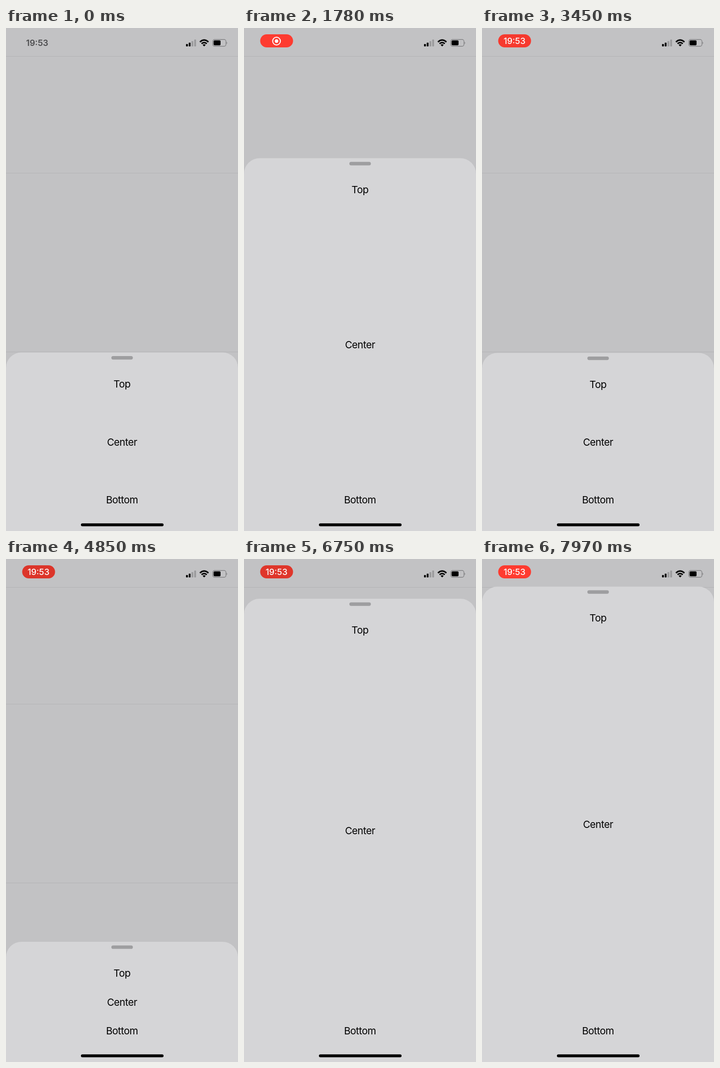
An HTML page for the animation above (8000 ms loop, 480 px wide and 1038 px high).

```html
<!DOCTYPE html>
<html lang="en">
<head>
<meta charset="utf-8">
<title>Bottom sheet</title>
<style>
  html, body { margin: 0; width: 100%; height: 100%; overflow: hidden; background: #c2c2c4; }
  svg { display: block; width: 100vw; height: 100vh; }
  text { font-family: Inter, Roboto, "Liberation Sans", sans-serif; text-anchor: middle; }
  .label { font-size: 20.5px; letter-spacing: -0.5px; }
  .clock { font-size: 17.5px; }
</style>
</head>
<body>
<svg viewBox="0 0 480 1038" preserveAspectRatio="none">
  <rect width="480" height="1038" fill="#c2c2c4"/>
  <path d="M0 58.5H480M0 299.5H480M0 668.5H480" stroke="#b4b4b6"/>

  <text id="plainClock" class="clock" x="64.5" y="37" font-weight="600" fill="#39393b">19:53</text>
  <g id="pill">
    <rect id="pillBody" x="33.5" y="13" width="68" height="27" rx="13.5"/>
    <text id="pillClock" class="clock" x="67.3" y="33.2" font-weight="500" fill="#fff">19:53</text>
    <g id="record" fill="#fff">
      <circle cx="67.3" cy="27" r="8" fill="none" stroke="#fff" stroke-width="2"/>
      <circle cx="67.3" cy="27" r="3.7"/>
    </g>
  </g>

  <g id="signal">
    <rect x="372.5" y="33" width="3.8" height="5" rx="1"/>
    <rect x="378" y="30.2" width="3.8" height="7.8" rx="1"/>
    <rect x="383.7" y="27" width="3.8" height="11" rx="1" fill="#9a9a9c"/>
    <rect x="389.4" y="23.7" width="3.8" height="14.3" rx="1" fill="#9a9a9c"/>
  </g>
  <g fill="none" stroke="#000" stroke-width="3">
    <path d="M401.2 28.8Q410 20.8 418.8 28.8"/>
    <path d="M404.6 32.4Q410 27.6 415.4 32.4"/>
  </g>
  <path d="M406.8 34.7Q410 32.2 413.2 34.7L410 38Z"/>
  <rect x="427.7" y="23.7" width="27.4" height="14" rx="4" fill="none" stroke="#79797b" stroke-width="1.2"/>
  <rect x="429.5" y="25.6" width="14.4" height="10.2" rx="2"/>
  <path d="M456.4 28.4Q458.8 30.7 456.4 33Z" fill="#79797b"/>

  <g id="sheet">
    <rect width="480" height="1100" rx="32" fill="#d5d5d7"/>
    <rect x="218" y="7.5" width="44.5" height="7.2" rx="3.6" fill="#9e9ea0"/>
    <text class="label" x="240" y="72.4">Top</text>
  </g>
  <text id="center" class="label" x="240">Center</text>
  <text class="label" x="240" y="981.4">Bottom</text>
  <rect x="155" y="1022.3" width="171" height="6" rx="3"/>
</svg>
<script>
const LOOP = 8000;
const FULL = 82, HALF = 669.5, TIP = 789.2;
const BASELINE = { top: 72.4, bottom: 981.4 };

// Each move springs from the previous resting place: [start ms, sheet top]
const moves = [
  [820, FULL], [1687, HALF], [2350, TIP],
  [3080, HALF], [4430, TIP], [5573, FULL]
];

const el = id => document.getElementById(id);
const [plainClock, pill, pillBody, pillClock, record, sheet, center] =
  ["plainClock", "pill", "pillBody", "pillClock", "record", "sheet", "center"].map(el);

const clamp = v => Math.min(1, Math.max(0, v));
const ramp = (t, from, to) => clamp((t - from) / (to - from));
const smooth = v => v * v * (3 - 2 * v);
const mix = (a, b, k) => a + (b - a) * k;

function spring(ms, response = 0.55, damping = 0.825) {
  if (ms <= 0) return 0;
  const s = ms / 1000;
  const omega = 2 * Math.PI / response;
  const root = Math.sqrt(1 - damping * damping);
  const angle = omega * root * s;
  return 1 - Math.exp(-damping * omega * s) *
    (Math.cos(angle) + damping / root * Math.sin(angle));
}

// Short upward pulls past the fully open position
function overpull(t) {
  const tug = Math.sin(Math.PI * ramp(t, 6380, 6740)) ** 2;
  return 25 * (tug + smooth(ramp(t, 7550, 7930)));
}

function sheetTop(t) {
  let top = HALF;
  for (const [start, target] of moves) top = mix(top, target, spring(t - start));
  return top - overpull(t);
}

function pillColor(t) {
  const k = 0.5 - 0.5 * Math.cos((t - 4850) / 2100 * 2 * Math.PI);
  const [r, g, b] = [[220, 255], [53, 59], [42, 48]].map(([lo, hi]) => Math.round(mix(lo, hi, k)));
  return `rgb(${r},${g},${b})`;
}

function draw(t) {
  const top = sheetTop(t);
  sheet.setAttribute("transform", `translate(0 ${top.toFixed(2)})`);
  center.setAttribute("y", ((top + BASELINE.top + BASELINE.bottom) / 2).toFixed(2));

  plainClock.setAttribute("opacity", 0.85 * (1 - ramp(t, 10, 220)));
  pill.setAttribute("opacity", smooth(ramp(t, 60, 430)));
  pillBody.setAttribute("fill", pillColor(t));
  const swap = ramp(t, 2400, 2700);
  record.setAttribute("opacity", 1 - swap);
  pillClock.setAttribute("opacity", swap);
}

const begin = performance.now();
function tick() {
  draw((performance.now() - begin) % LOOP);
  requestAnimationFrame(tick);
}
tick();
</script>
</body>
</html>
```
